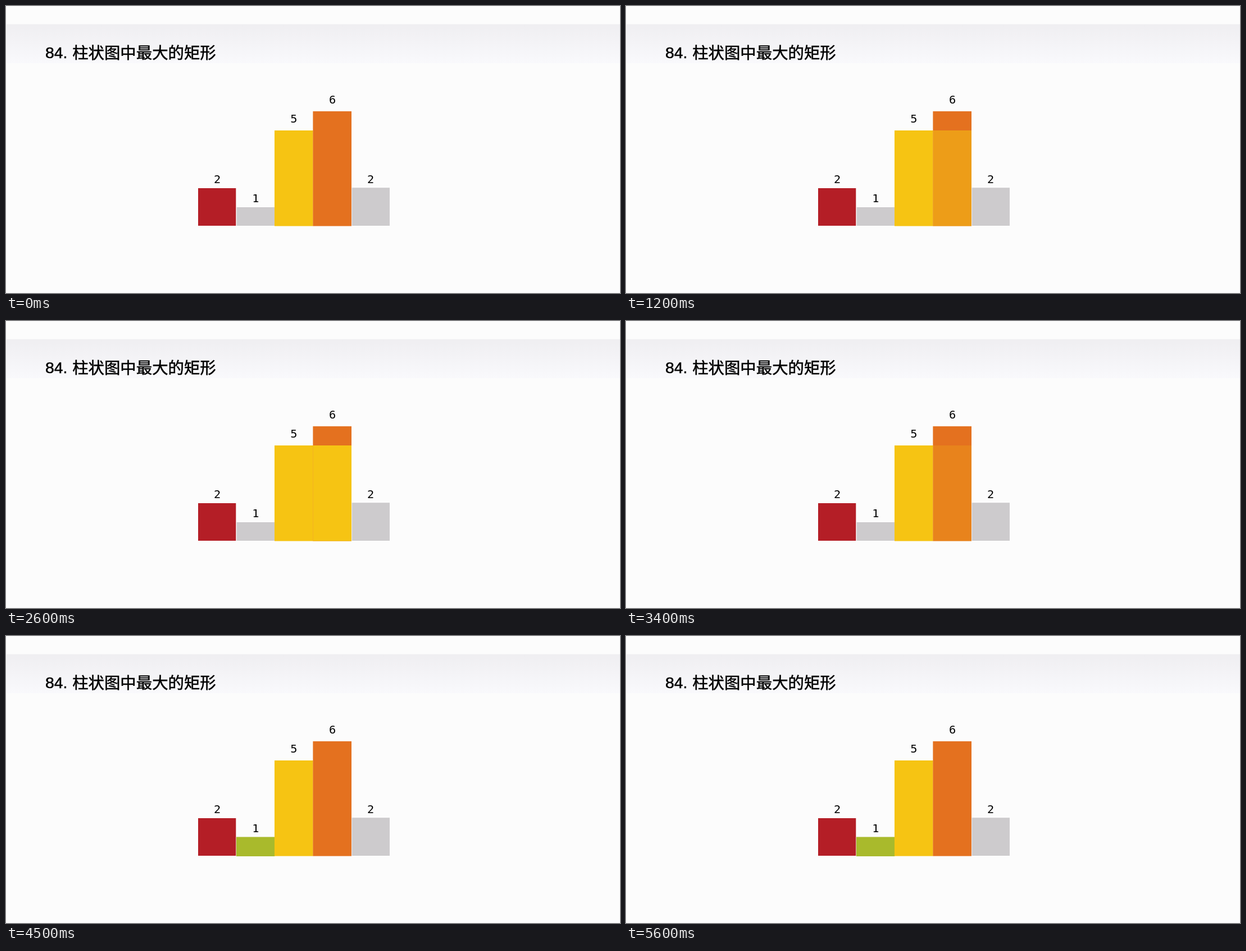
Write an HTML page that moves like this. It is 1093x512 px and loops after 5.7 s.

```html
<!DOCTYPE html>
<html lang="zh">
<head>
<meta charset="utf-8">
<title>柱状图中最大的矩形</title>
<style>
  html, body { margin: 0; height: 100%; overflow: hidden; background: #fcfcfc; }
  svg { display: block; width: 100%; height: 100%; }
  .title { font-size: 28.4px; stroke: #000; stroke-width: .55px; }
  .num { font-family: "Liberation Sans", Arial, sans-serif; }
  .han { font-family: "Noto Sans CJK SC", "Noto Sans CJK", sans-serif; }
  .labels { font: 20.3px "DejaVu Sans Mono", monospace; text-anchor: middle; }
  .gray { fill: #cdcbcd; }
  .yellow { fill: #f6c413; }

  .spread { opacity: 0; animation: spread 5.7s infinite; }
  .found { opacity: 0; animation: found 5.7s infinite; }

  /* Dissolves advance in 100 ms steps */
  @keyframes spread {
    0% { opacity: 0; animation-timing-function: step-end; }
    17.54% { opacity: .13; animation-timing-function: steps(4, end); }
    24.56% { opacity: .93; animation-timing-function: step-end; }
    26.31% { opacity: 1; animation-timing-function: step-end; }
    54.38% { opacity: .82; animation-timing-function: steps(3, end); }
    59.64% { opacity: .22; animation-timing-function: step-end; }
    61.4%, 100% { opacity: 0; }
  }
  @keyframes found {
    0% { opacity: 0; animation-timing-function: step-end; }
    63.15% { opacity: .16; animation-timing-function: steps(3, end); }
    68.42% { opacity: .76; animation-timing-function: step-end; }
    70.17%, 100% { opacity: 1; }
  }
</style>
</head>
<body>
<svg viewBox="0 0 1093 512">
  <defs>
    <linearGradient id="band" x2="0" y2="1">
      <stop stop-color="#efeef1"/>
      <stop offset="1" stop-color="#f9f9fc"/>
    </linearGradient>
  </defs>
  <rect width="1093" height="512" fill="#fcfcfc"/>
  <rect x="1" y="32.5" width="1092" height="69.5" fill="url(#band)"/>

  <g class="title">
    <text class="num" x="70" y="93.3">84.</text>
    <text class="han" x="118.2" y="93.8">柱状图中最大的矩形</text>
  </g>

  <rect x="342" y="325" width="67.3" height="67" fill="#b41e26"/>
  <rect class="gray" x="410.7" y="359" width="67.3" height="33"/>
  <rect class="gray" x="615.7" y="324.2" width="67.3" height="67.8"/>
  <rect class="found" x="410" y="358.5" width="68.3" height="34.5" fill="#a9ba2c"/>
  <rect class="yellow" x="478" y="222" width="68.6" height="170.6"/>
  <rect x="546.4" y="187.8" width="68.6" height="204.8" fill="#e4711f"/>
  <rect class="yellow spread" x="546.4" y="222" width="68.6" height="170.6"/>

  <g class="labels">
    <text x="376" y="316">2</text>
    <text x="444.3" y="350">1</text>
    <text x="512.4" y="207.7">5</text>
    <text x="581" y="173.5">6</text>
    <text x="649.2" y="316">2</text>
  </g>
</svg>
</body>
</html>
```
